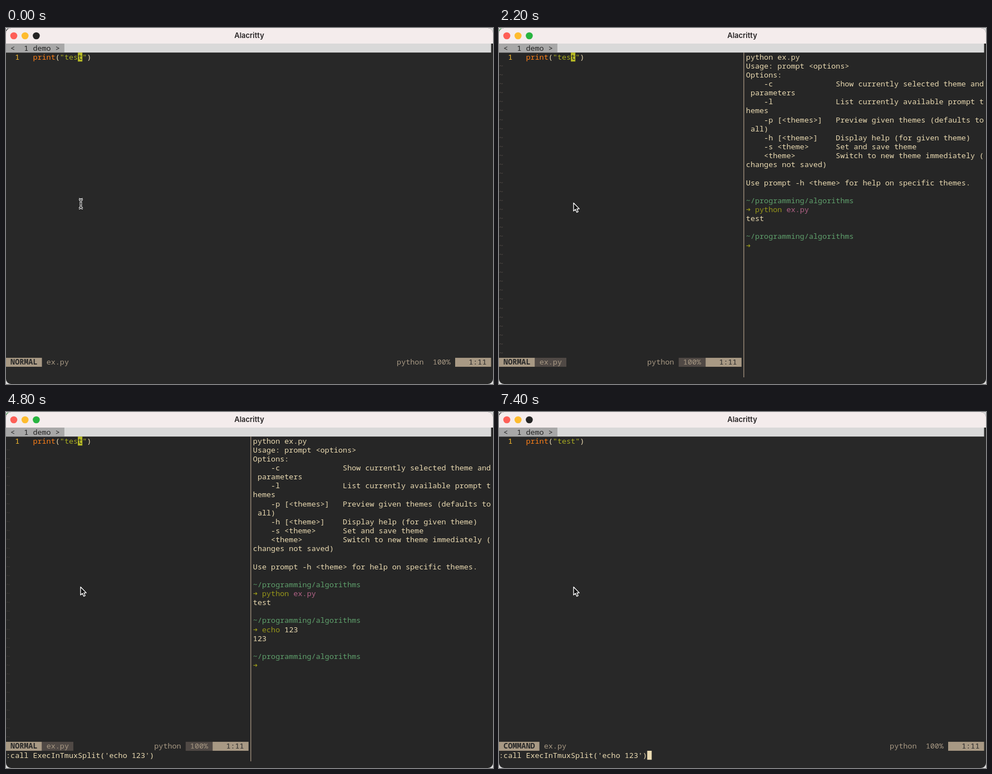
An HTML page with a canvas that plays this animation: 875x640 px, repeating every 8 s.

```html
<!DOCTYPE html>
<html lang="en">
<head>
<meta charset="utf-8">
<title>Terminal split demo</title>
<style>
html, body { margin: 0; width: 100%; height: 100%; overflow: hidden; background: #ddd; }
canvas { display: block; width: 875px; height: 640px; }
</style>
</head>
<body>
<canvas id="stage" width="875" height="640"></canvas>
<script>
const ctx = document.getElementById('stage').getContext('2d');
const LOOP = 8000, CELL_W = 8.07, CELL_H = 16.14, TOP = 28;
const MONO = '13.45px "Noto Sans Mono", "DejaVu Sans Mono", monospace';
const DARK = '#282828', CREAM = '#ebdbb2', TAN = '#a89984', BROWN = '#504945',
      GREEN = '#b8bb26', OLIVE = '#98971a', AQUA = '#5fa06c', PINK = '#b16286';

const PYTHON = ":call ExecInTmuxSplit('python ex.py')";
const ECHO = ":call ExecInTmuxSplit('echo 123')";
const USAGE = `Usage: prompt <options>
Options:
    -c              Show currently selected theme and
 parameters
    -l              List currently available prompt t
hemes
    -p [<themes>]   Preview given themes (defaults to
 all)
    -h [<theme>]    Display help (for given theme)
    -s <theme>      Set and save theme
    <theme>         Switch to new theme immediately (
changes not saved)

Use prompt -h <theme> for help on specific themes.`.split('\n');

const between = (t, from, to) => t >= from && t < to;

function cells(col, row, width, color) {
  ctx.fillStyle = color;
  ctx.fillRect(col * CELL_W, TOP + row * CELL_H, width * CELL_W, CELL_H);
}

function text(col, row, str, color, weight = 400) {
  ctx.font = `${weight} ${MONO}`;
  ctx.fillStyle = color;
  ctx.fillText(str, col * CELL_W, TOP + row * CELL_H + 12.5);
}

function windowFrame(split) {
  ctx.fillStyle = '#ddd';
  ctx.fillRect(0, 0, 875, 640);
  ctx.strokeStyle = split ? '#3a9a45' : '#333';
  ctx.lineWidth = 1.5;
  ctx.beginPath();
  ctx.moveTo(0, 5);
  ctx.lineTo(4, 1);
  ctx.stroke();

  ctx.save();
  ctx.beginPath();
  ctx.roundRect(0, 0, 875, 640, 9);
  ctx.clip();
  ctx.fillStyle = split ? '#262626' : DARK;
  ctx.fillRect(0, 0, 875, 640);
  ctx.fillStyle = '#f4ecec';
  ctx.fillRect(0, 0, 875, TOP);
  ctx.restore();

  ['#fe5f57', '#febc2e', split ? '#28b440' : '#242424'].forEach((color, i) => {
    ctx.fillStyle = color;
    ctx.beginPath();
    ctx.arc(14 + i * 20.2, 14, 6.3, 0, 7);
    ctx.fill();
  });
  ctx.font = '600 13px Inter, sans-serif';
  ctx.fillStyle = '#262324';
  ctx.textAlign = 'center';
  ctx.fillText('Alacritty', 437, 18.3);
  ctx.textAlign = 'left';
}

function tabBar(prefix) {
  cells(0, 0, 108, '#d9d9d9');
  cells(0, 0, 13, '#a8a8a8');
  text(1, 0, '<  1 demo >', '#222');
  if (prefix) text(103, 0, '<C-b>', '#222');
}

function editor(state) {
  text(2, 1, '1', '#fabd2f');
  text(6, 1, 'print', '#fe8019');
  text(11, 1, '(', CREAM);
  text(12, 1, '"test"', '#a9ad22');
  text(18, 1, ')', CREAM);
  if (state.codeCursor) {
    cells(16, 1, 1, GREEN);
    text(16, 1, 't', DARK);
  }
  if (state.split)
    for (let row = 2; row < 35; row++) text(0, row, '~', state.dim ? '#3c3836' : BROWN);
}

function statusLine({ mode, split }) {
  const end = split ? 54 : 108, modeWidth = mode.length + 2;
  const weight = split ? 400 : 300;
  cells(0, 35, modeWidth, TAN);
  text(1, 35, mode, DARK, 700);
  if (split) {
    cells(modeWidth, 35, 7, BROWN);
    cells(end - 14, 35, 6, BROWN);
  }
  text(modeWidth + 1, 35, 'ex.py', TAN, weight);
  text(end - 21, 35, 'python', TAN, weight);
  text(end - 13, 35, '100%', TAN, weight);
  cells(end - 8, 35, 8, TAN);
  text(end - 5, 35, '1:11', DARK);
}

function commandLine({ command, mode }) {
  text(0, 36, command, CREAM);
  if (mode === 'COMMAND') cells(command.length, 36, 1, CREAM);
}

function prompt(row) {
  text(55, row, '~/programming/algorithms', AQUA);
  text(55, row + 1, '➜', OLIVE);
}

function shellPane(t, focused) {
  ctx.fillStyle = '#8b7e6e';
  ctx.fillRect(439, 44, 1.6, 584);
  text(55, 1, 'python ex.py', CREAM);
  if (t >= 1900) USAGE.forEach((line, i) => text(55, 2 + i, line, CREAM));
  if (t >= 2000) prompt(17);
  if (t >= 2100) {
    text(57, 18, 'python', OLIVE);
    text(64, 18, 'ex.py', PINK);
    text(55, 19, 'test', CREAM);
    prompt(21);
  }
  if (t >= 4700) {
    text(57, 22, 'echo', OLIVE);
    text(62, 22, '123', CREAM);
  }
  if (t >= 4800) {
    text(55, 23, '123', CREAM);
    prompt(25);
  }
  if (focused) cells(57, 26, 1, CREAM);
}

function pointer(beam) {
  ctx.lineJoin = 'round';
  if (beam) {
    const path = new Path2D('M131 307.5Q134.5 308 134.5 311V320.5Q134.5 324 131 324.5M138 307.5Q134.5 308 134.5 311M134.5 320.5Q134.5 324 138 324.5M132.5 316H136.5');
    for (const [color, width] of [['#fff', 3.4], ['#111', 1.2]]) {
      ctx.strokeStyle = color;
      ctx.lineWidth = width;
      ctx.stroke(path);
    }
  } else {
    const path = new Path2D('M134 314.5V329L137.3 326L139.7 331.3L142.2 330.2L139.9 325.1H144.3Z');
    ctx.fillStyle = '#111';
    ctx.fill(path);
    ctx.strokeStyle = '#fff';
    ctx.lineWidth = 1.3;
    ctx.stroke(path);
  }
}

function commandAt(t) {
  const steps = [[100, ':'], [800, ECHO], [1100, PYTHON], [1800, ''], [3300, ':'],
                 [3800, PYTHON], [4200, ECHO], [6100, ''], [7000, ':'], [7400, ECHO]];
  return steps.reduce((current, [at, value]) => t >= at ? value : current, '');
}

function draw(t) {
  const typing = between(t, 100, 1700) || between(t, 3300, 4700) || t >= 7000;
  const shellFocus = between(t, 5600, 6100);
  const state = {
    split: between(t, 1800, 6100),
    mode: typing ? 'COMMAND' : 'NORMAL',
    command: commandAt(t),
    codeCursor: !typing && !shellFocus,
    dim: between(t, 4700, 5100)
  };
  windowFrame(state.split);
  tabBar(between(t, 5400, 5600) || between(t, 5800, 6100));
  editor(state);
  statusLine(state);
  commandLine(state);
  if (state.split) shellPane(t, shellFocus);
  // Holding Shift for the colon turns the pointer into a text beam.
  pointer(t < 300 || between(t, 3200, 3500) || between(t, 6900, 7200));
}

const start = performance.now();
function frame() {
  draw((performance.now() - start) % LOOP);
  requestAnimationFrame(frame);
}
frame();
</script>
</body>
</html>
```
